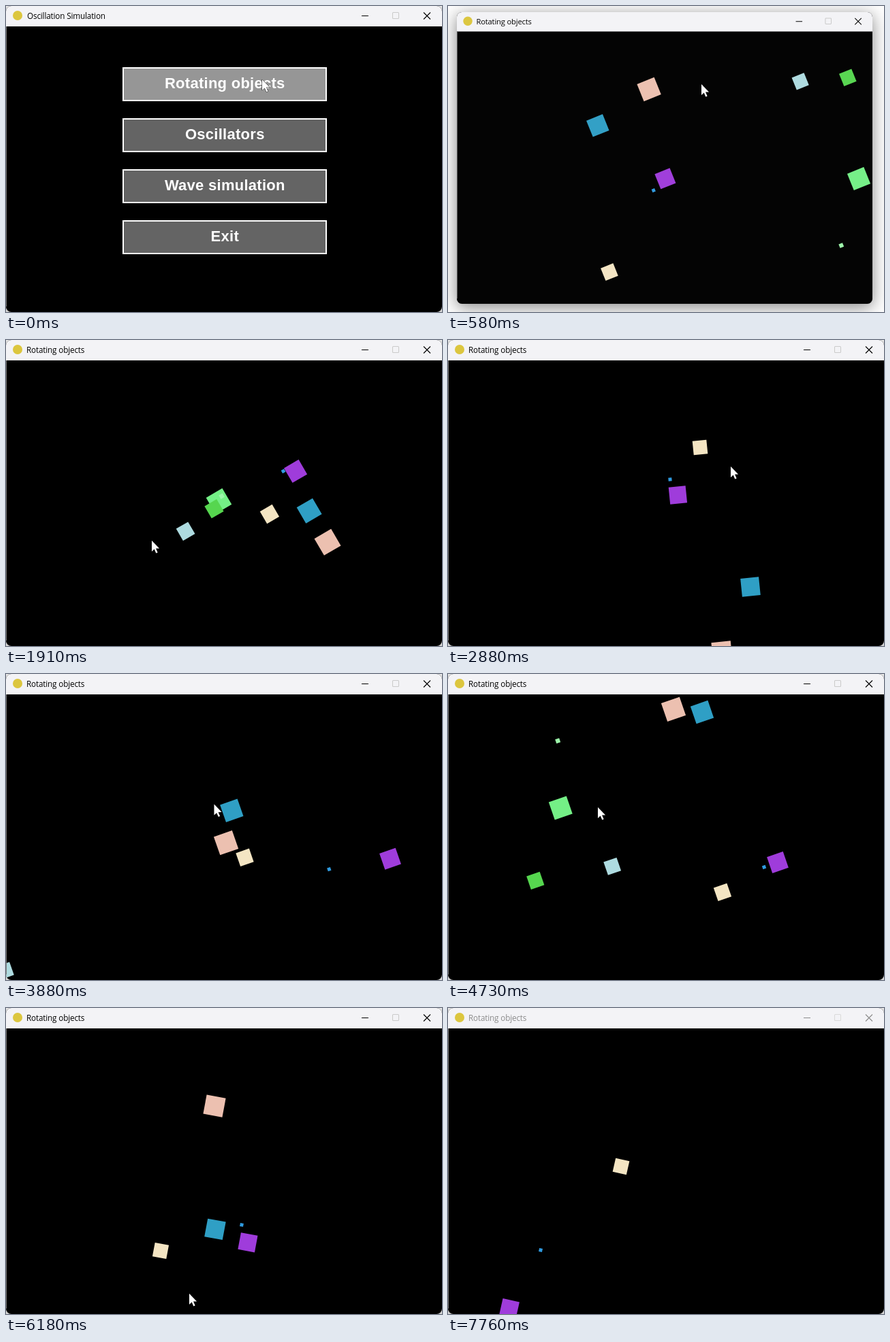
Animation, 640 px wide and 450 px high, one loop 7790 ms. Source, as an HTML page:

```html
<!DOCTYPE html>
<html lang="en">
<head>
<meta charset="utf-8">
<title>Rotating objects</title>
<style>
  html, body { margin: 0; width: 100%; height: 100%; overflow: hidden; background: #fdfdfd; }
  svg { display: block; width: 640px; height: 450px; }
  .win { transform-origin: 276px 191px; filter: drop-shadow(0 5px 13px rgba(0, 0, 0, .48)); }
  .title { font: 11.7px "Open Sans", "Noto Sans", sans-serif; letter-spacing: -.15px; fill: #000; }
  .btn rect { fill: #646464; stroke: #fff; stroke-width: 2; }
  .btn.hover rect { fill: #969696; }
  .btn text { font: bold 22px "Liberation Sans", Arial, sans-serif; letter-spacing: .27px; fill: #fff; text-anchor: middle; }
  .ctl { fill: none; stroke: #000; stroke-width: 1.1; }
  .max { stroke: #cbcbcb; }
  .idle .title { fill: #8c8c8c; }
  .idle .ctl { stroke: #8c8c8c; }
  .idle .max { stroke: #dadada; }
</style>
</head>
<body>
<svg viewBox="0 0 640 450">
  <clipPath id="frame"><rect width="640" height="450" rx="8"/></clipPath>
  <g id="stage"></g>
  <path id="cursor" d="M0 0V16L3.7 12.6L6.3 18.5L8.6 17.5L6 11.6L11 11.4Z" fill="#fff" stroke="#111" paint-order="stroke"/>
</svg>
<script>
const LOOP = 7.79, PULL = 350, STEPS = 120;
const clamp = v => Math.min(1, Math.max(0, v));
const mix = (a, b, u) => a + (b - a) * u;
const cursor = document.getElementById('cursor');

function add(parent, tag, attrs, text) {
  const el = document.createElementNS('http://www.w3.org/2000/svg', tag);
  for (const k in attrs) el.setAttribute(k, attrs[k]);
  if (text) el.textContent = text;
  return parent.appendChild(el);
}

function makeWindow(title, x) {
  const win = add(document.getElementById('stage'), 'g', { class: 'win' });
  const g = add(win, 'g', { 'clip-path': 'url(#frame)' });
  add(g, 'rect', { width: 640, height: 450 });
  const body = add(g, 'g', {});
  add(g, 'rect', { width: 640, height: 30, fill: '#f3f3f6' });
  add(g, 'circle', { cx: 17, cy: 14, r: 7, fill: '#dcc63e' });
  add(g, 'text', { class: 'title', x, y: 19 }, title);
  add(g, 'path', { class: 'ctl', d: 'M522 14.5h10M613 9.5l10 10m0-10l-10 10' });
  add(g, 'rect', { class: 'ctl max', x: 567.5, y: 9.5, width: 9, height: 9, rx: 1 });
  add(g, 'path', { d: 'M.5 30v412', stroke: '#777' });
  return { win, body };
}

const menu = makeWindow('Oscillation Simulation', 31);
const scene = makeWindow('Rotating objects', 30);

['Rotating objects', 'Oscillators', 'Wave simulation', 'Exit'].forEach((label, i) => {
  const g = add(menu.body, 'g', { class: i ? 'btn' : 'btn hover' });
  add(g, 'rect', { x: 172, y: 91 + 75 * i, width: 298, height: 48 });
  add(g, 'text', { x: 321.3, y: 121 + 75 * i }, label);
});

// Flight under a constant pull towards the centre
function fly(p, vx, vy, T) {
  const h = T / STEPS, pts = [[p.x, p.y]];
  let { x, y } = p;
  const kick = d => {
    const f = -PULL * d / Math.max(20, Math.hypot(x, y));
    vx += f * x; vy += f * y;
  };
  for (let i = 0; i < STEPS; i++) {
    kick(h / 2);
    x += vx * h; y += vy * h;
    kick(h / 2);
    pts.push([x, y]);
  }
  return pts;
}

// Finds the launch speed that carries an object from p to q
function shoot(p, q) {
  const T = q.t - p.t, mx = p.x + q.x, my = p.y + q.y;
  const lift = PULL * T / 2 / (Math.hypot(mx, my) || 1);
  let vx = (q.x - p.x) / T + lift * mx, vy = (q.y - p.y) / T + lift * my;
  let best, least = Infinity;
  for (let i = 0; i < 30; i++) {
    const pts = fly(p, vx, vy, T), [x, y] = pts[STEPS];
    const ex = q.x - x, ey = q.y - y, miss = Math.hypot(ex, ey);
    if (miss < least) { least = miss; best = { pts, ex, ey }; }
    vx += .8 * ex / T; vy += .8 * ey / T;
  }
  return best.pts.map(([x, y], i) => [x + best.ex * i / STEPS, y + best.ey * i / STEPS]);
}

// Wide turns lead through the centre, narrow ones arc around it
function route(stops) {
  const keys = [stops[0]];
  stops.slice(1).forEach((q, i) => {
    const p = stops[i], rp = Math.hypot(p.x, p.y), rq = Math.hypot(q.x, q.y);
    if (p.x * q.x + p.y * q.y < .6 * rp * rq) keys.push({ t: mix(p.t, q.t, rp / (rp + rq)), x: 0, y: 0 });
    keys.push(q);
  });
  return keys;
}

function box(fill, size, times, ...points) {
  const keys = route(points.map(([x, y], i) => ({ t: times[i], x, y })));
  return {
    keys,
    legs: keys.slice(1).map((q, i) => shoot(keys[i], q)),
    el: add(scene.body, 'rect', { x: -size / 2, y: -size / 2, width: size, height: size, fill })
  };
}

// Points are measured from the centre of the stage
const times = [.58, 1.91, 2.88, 4.73, 6.18, 7.76];
const orbit = (fill, size, ...points) => box(fill, size, times, ...points);

// Swings out to the left once, then escapes along its opening direction
const swing = (fill, size, from, near, far) =>
  box(fill, size, [times[0], times[1], times[3], times[5]], from, near, far, from.map(v => 3 * v));

const boxes = [
  orbit('#ecc0b0', 28.5, [-24, -121], [152, 57], [82, 218], [11, -188], [-14, -96], [-10, 290]),
  orbit('#2f9fc5', 27, [-103, -65], [125, 11], [124, 123], [53, -184], [-13, 85], [-20, 250]),
  orbit('#9f3cdb', 25, [1, 17], [105, -47], [17, -12], [164, 37], [35, 105], [-230, 202]),
  orbit('#2f9be0', 5, [-17, 35], [87, -47], [6, -35], [144, 44], [26, 79], [-184, 116]),
  orbit('#f4e5c3', 20.7, [-85, 161], [67, 16], [50, -82], [83, 81], [-93, 117], [-66, -7]),
  swing('#aedbe0', 20.3, [209, -133], [-56, 41], [-79, 43]),
  swing('#74ef86', 27.5, [299, 17], [-7, -3], [-155, -43]),
  swing('#9df6aa', 6.3, [272, 120], [-3, -10], [-159, -142]),
  swing('#56d64f', 20.6, [282, -139], [-14, 8], [-192, 64])
];

const trail = [
  { t: 0, x: 376, y: 108 }, { t: .2, x: 372, y: 115 }, { t: 1.15, x: 372, y: 115 },
  { t: 1.91, x: 214, y: 295 }, { t: 2.88, x: 415, y: 186 }, { t: 4.73, x: 220, y: 196 },
  { t: 6.18, x: 269, y: 420 }, { t: 6.68, x: 155, y: 54 }, { t: 7.4, x: 300, y: 460 }
];

// Index of the current leg and progress along it
function locate(keys, t) {
  let i = 0;
  while (i < keys.length - 2 && t >= keys[i + 1].t) i++;
  return [i, clamp((t - keys[i].t) / (keys[i + 1].t - keys[i].t))];
}

// Every box turns alike, spinning up steadily
function angle(t) {
  const s = t - times[0];
  return -22 + 28.7 * s + 49.2 * s * s / 2;
}

function show({ win }, opacity, scale) {
  win.style.display = opacity > 0 ? '' : 'none';
  win.style.opacity = opacity;
  win.style.transform = scale === 1 ? 'none' : `scale(${scale})`;
}

function draw(t) {
  const shut = clamp((t - .39) / .09), open = clamp((t - .48) / .21);
  show(menu, 1 - shut, 1 - .06 * shut);
  show(scene, clamp((t - .48) / .103), .9 + .1 * Math.pow(open, .855));
  scene.win.classList.toggle('idle', t >= 7.52);

  const a = angle(t);
  for (const { keys, legs, el } of boxes) {
    const [i, u] = locate(keys, t), n = Math.min(STEPS - 1, Math.floor(u * STEPS));
    const p = legs[i][n], q = legs[i][n + 1], f = u * STEPS - n;
    el.setAttribute('transform', `translate(${320 + mix(p[0], q[0], f)} ${240 + mix(p[1], q[1], f)}) rotate(${a})`);
  }

  const [i, u] = locate(trail, t), s = u * u * (3 - 2 * u), p = trail[i], q = trail[i + 1];
  cursor.setAttribute('transform', `translate(${mix(p.x, q.x, s)} ${mix(p.y, q.y, s)})`);
}

const start = performance.now();
function tick() {
  draw((performance.now() - start) / 1000 % LOOP);
  requestAnimationFrame(tick);
}
tick();
</script>
</body>
</html>
```
